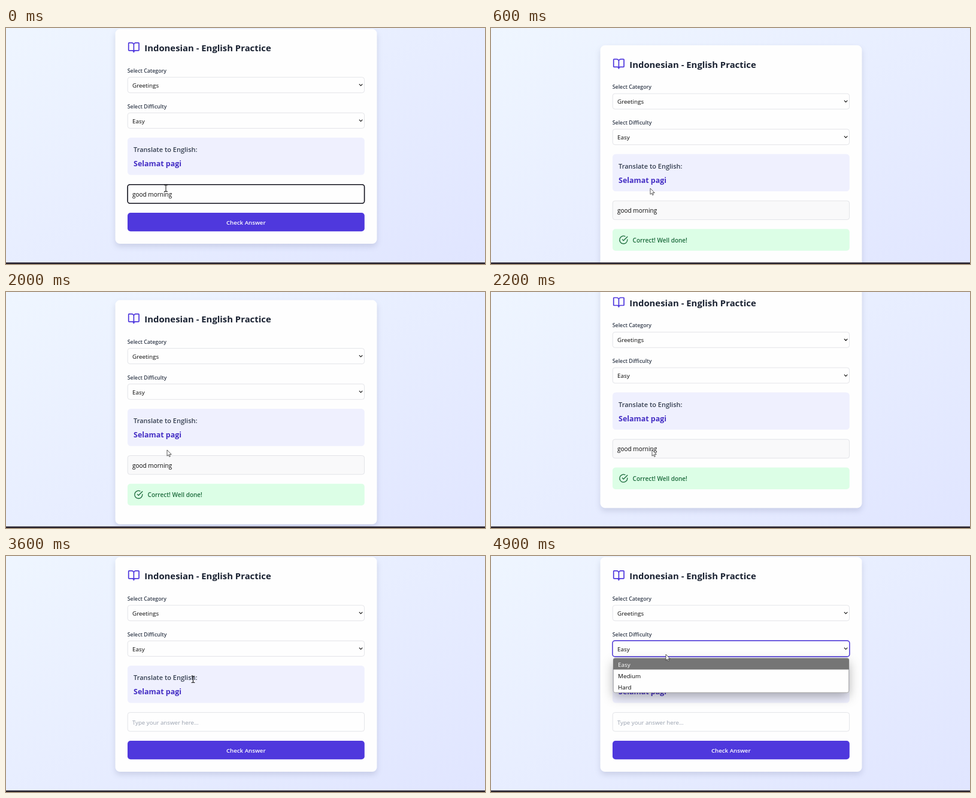
An HTML page that plays this animation: 800 px wide and 396 px high, repeating every 5000 ms.

```html
<!DOCTYPE html>
<html lang="en">
<head>
<meta charset="utf-8">
<title>Indonesian - English Practice</title>
<style>
  html, body { margin: 0; width: 100%; height: 100%; overflow: hidden; background: #e8eeff; }
  svg { display: block; width: 100vw; height: 100vh; }
  text { font: 500 9.85px "Open Sans", "Noto Sans", sans-serif; fill: #080808; }
  .title { font-size: 14.86px; font-weight: 700; fill: #1a2232; }
  .label { font-size: 8.78px; font-weight: 600; fill: #323b4b; }
  .ask { font-size: 11px; font-weight: 600; fill: #333d4e; }
  .word { font-size: 12.42px; font-weight: 700; fill: #432dc4; }
  .typed { font-size: 10.05px; }
  .hint { font-size: 9.7px; font-weight: 400; fill: #99a1af; }
  .go { font-size: 9.7px; font-weight: 600; fill: #fff; text-anchor: middle; }
  .ok { font-size: 10px; font-weight: 600; fill: #1b6a3b; }
  .light { fill: #fff; }
  .field { fill: #fefefe; stroke: #dcdee3; stroke-width: .8; }
  .line { fill: none; stroke-linecap: round; stroke-linejoin: round; }
  #card { fill: #fefefe; filter: drop-shadow(0 5px 5px rgba(20, 30, 80, .13)); }
  #menuBox { fill: #fefefe; filter: drop-shadow(0 7px 9px rgba(0, 0, 0, .3)); }
</style>
</head>
<body>
<svg viewBox="0 0 800 396" preserveAspectRatio="none">
  <defs>
    <linearGradient id="sky" x1="0" y1="0" x2="1" y2="1">
      <stop stop-color="#eff6ff"/><stop offset="1" stop-color="#e0e5ff"/>
    </linearGradient>
    <path id="chevron" class="line" d="M590.2 -1.4l2.4 2.5 2.4 -2.5" stroke="#111" stroke-width="1.1"/>
  </defs>

  <g id="page">
    <rect id="sheet" width="800" height="420.5" fill="url(#sky)"/>
    <rect id="card" x="182.5" y="29.1" width="437" height="360.4" rx="7.8"/>

    <g class="line" transform="translate(203 49.7) scale(.867)" stroke="#4f38dd" stroke-width="2">
      <path d="M12 7v14M3 18a1 1 0 0 1-1-1V4a1 1 0 0 1 1-1h5a4 4 0 0 1 4 4 4 4 0 0 1 4-4h5a1 1 0 0 1 1 1v13a1 1 0 0 1-1 1h-6a3 3 0 0 0-3 3 3 3 0 0 0-3-3z"/>
    </g>
    <text class="title" x="231.3" y="66.8">Indonesian - English Practice</text>

    <text class="label" x="202.8" y="102.2">Select Category</text>
    <rect class="field" x="203.2" y="110.1" width="395.4" height="26" rx="3.9"/>
    <text x="211" y="127.1">Greetings</text>
    <use href="#chevron" y="123.2"/>

    <text class="label" x="202.8" y="162">Select Difficulty</text>
    <rect class="field" x="203.2" y="169.8" width="395.4" height="26" rx="3.9"/>
    <rect id="ring" x="202.9" y="169.5" width="396" height="26.8" rx="4.2" fill="none" stroke="#5a45da" stroke-width="1.6"/>
    <text x="211" y="187">Easy</text>
    <use href="#chevron" y="183"/>

    <rect x="203" y="211.4" width="395.8" height="62.5" rx="5.2" fill="#eff0fe"/>
    <text class="ask" x="213" y="235.6">Translate to English:</text>
    <text class="word" x="213.1" y="259.6">Selamat pagi</text>

    <rect id="input" class="field" x="203.2" y="290" width="395.4" height="31.6" rx="3.9"/>
    <rect id="focus" x="203.1" y="290.1" width="395.5" height="31.6" rx="4" fill="none" stroke="#11111c" stroke-width="1.6"/>
    <text id="typed" class="typed" x="210.9" y="310.1">good morning</text>
    <text id="hint" class="hint" x="210.9" y="310.1">Type your answer here...</text>

    <g id="check">
      <rect x="203" y="337.4" width="395.8" height="31.3" rx="5" fill="#4f38dd"/>
      <text class="go" x="400.8" y="357.3">Check Answer</text>
    </g>

    <g id="result">
      <rect x="203" y="337.3" width="395.8" height="36.5" rx="5" fill="#dcfee6"/>
      <g class="line" transform="translate(213.5 347.7) scale(.65)" stroke="#1b6a3b" stroke-width="2">
        <path d="M22 11.08V12a10 10 0 1 1-5.93-9.14M9 11l3 3L22 4"/>
      </g>
      <text class="ok" x="236.6" y="359.7">Correct! Well done!</text>
    </g>
  </g>

  <g id="menu">
    <rect id="menuBox" x="204" y="171.5" width="394" height="58" rx="3"/>
    <path d="M204 190.6V174.5a3 3 0 0 1 3-3H595a3 3 0 0 1 3 3V190.6Z" fill="#757575"/>
    <rect x="204.3" y="171.8" width="393.4" height="57.4" rx="3" fill="none" stroke="#7b7b7b" stroke-width=".7"/>
    <text class="light" x="212" y="185.6">Easy</text>
    <text x="212" y="204.7">Medium</text>
    <text x="212" y="223.7">Hard</text>
  </g>

  <rect y="393.4" width="800" height="2.6" fill="#28222c"/>

  <g id="pointer">
    <path id="arrow" d="M0 0V10.2L2.3 8.1 3.8 11.5 5.4 10.8 3.9 7.5H7.2Z" fill="#fff" stroke="#333" stroke-width=".8" stroke-linejoin="round"/>
    <path id="beam" class="line" d="M-2.4 -5.2H-.8L0 -4.6 .8 -5.2H2.4M0 -4.6V4.8M-2.4 5.4H-.8L0 4.8 .8 5.4H2.4" stroke="#222" stroke-width="1.1"/>
  </g>
</svg>

<script>
  const LOOP = 5000, STEP = 100;
  const CHECKED = 200, NEXT = 3300, OPEN = 4500;

  // [time, scroll]
  const scroll = [
    [0, 27.4], [300, 27.4], [400, 11], [500, 0], [1900, 0],
    [2000, 15.5], [2100, 36], [2200, 42.8], [3200, 42.8]
  ];
  // [time, x, y]
  const path = [
    [0, 267, 269], [600, 266, 269], [1200, 266, 269], [1400, 268, 266],
    [1800, 269, 265], [2500, 269, 265], [2900, 311.4, 206.4], [3300, 311.4, 206.4],
    [3600, 312.5, 207], [3700, 312.5, 207], [4200, 293, 160],
    [4500, 292, 160], [4800, 292, 165]
  ];

  const $ = id => document.getElementById(id);
  const show = (id, on) => { $(id).style.display = on ? "" : "none"; };

  function sample(keys, t) {
    const i = keys.findIndex(k => k[0] > t);
    if (i < 0) return keys[keys.length - 1].slice(1);
    const a = keys[i - 1], b = keys[i];
    const p = (t - a[0]) / (b[0] - a[0]);
    return a.slice(1).map((v, n) => v + (b[n + 1] - v) * p);
  }

  function draw(t) {
    const checked = t >= CHECKED && t < NEXT;
    const fresh = t >= NEXT, open = t >= OPEN;
    const extra = checked ? 15.7 : 0;
    const top = fresh ? 27.4 : sample(scroll, t)[0];
    const beam = t < CHECKED || (fresh && t < 3900);

    $("page").setAttribute("transform", `translate(0 ${-top})`);
    $("sheet").setAttribute("height", 420.5 + extra);
    $("card").setAttribute("height", 360.4 + extra);
    $("input").style.fill = checked ? "#f9f9fa" : "#fefefe";
    show("focus", t < CHECKED);
    show("typed", !fresh);
    show("hint", fresh);
    show("check", !checked);
    show("result", checked);
    show("ring", open);
    show("menu", open);
    show("beam", beam);
    show("arrow", !beam);
    $("pointer").setAttribute("transform", `translate(${sample(path, t).join(" ")})`);
  }

  const start = performance.now();
  function tick() {
    const t = (performance.now() - start) % LOOP;
    draw(Math.floor(t / STEP) * STEP);
    requestAnimationFrame(tick);
  }
  tick();
</script>
</body>
</html>
```
